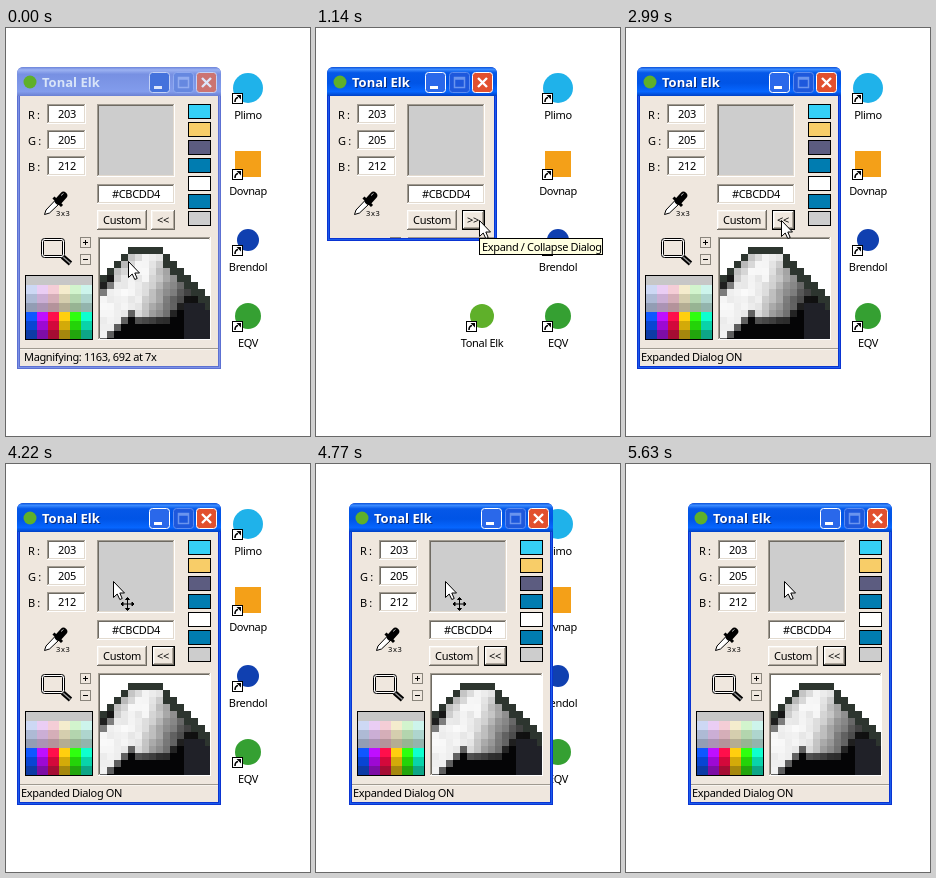
Animation of 304x408 px, one loop 6360 ms. Source, as an HTML page:

```html
<!DOCTYPE html>
<html lang="en">
<head>
<meta charset="utf-8">
<title>Color picker demo</title>
<style>
html, body { margin: 0; width: 100%; height: 100%; overflow: hidden; background: #fff; }
svg { display: block; }
text { font: 11px "Noto Sans", "Open Sans", sans-serif; letter-spacing: -.35px; white-space: pre; }
.mid { text-anchor: middle; }
.title { font: 700 13px "Open Sans", sans-serif; letter-spacing: 0; }
.tiny { font-size: 7.5px; letter-spacing: .6px; }
</style>
</head>
<body>
<svg id="stage" width="304" height="408" viewBox="0 0 304 408">
  <defs>
    <linearGradient id="on" x2="0" y2="1">
      <stop offset="0" stop-color="#0a50d8"/><stop offset=".08" stop-color="#3c8cff"/>
      <stop offset=".2" stop-color="#0558e8"/><stop offset=".55" stop-color="#0054e6"/>
      <stop offset=".85" stop-color="#0666ff"/><stop offset="1" stop-color="#0040c4"/>
    </linearGradient>
    <linearGradient id="off" x2="0" y2="1">
      <stop offset="0" stop-color="#6c84da"/><stop offset=".1" stop-color="#9cb2f2"/>
      <stop offset=".25" stop-color="#7790e2"/><stop offset=".85" stop-color="#829cec"/>
      <stop offset="1" stop-color="#6a80d2"/>
    </linearGradient>
  </defs>
  <g id="desk"></g>
  <g id="win">
    <g id="frame"></g>
    <svg id="body" x="3" y="29">
      <g transform="translate(-14 -68)">
        <g id="controls"></g><g id="toggle"></g><g id="status"></g>
      </g>
    </svg>
  </g>
  <g id="tip"></g>
  <g id="cursor"></g>
</svg>
<script>
const LOOP = 6360, FACE = '#efe7de', APP = 'Tonal Elk';
const $ = id => document.getElementById(id);
const rect = (x, y, w, h, fill, more = '') =>
  `<rect x="${x}" y="${y}" width="${w}" height="${h}" fill="${fill}" ${more}/>`;
const text = (x, y, s, cls = '', fill = '#000') =>
  `<text x="${x}" y="${y}" class="${cls}" fill="${fill}">${s}</text>`;
const path = (d, stroke, width = 1, fill = 'none') =>
  `<path d="${d}" stroke="${stroke}" stroke-width="${width}" fill="${fill}"/>`;
const dot = (x, y, r, fill) => `<circle cx="${x}" cy="${y}" r="${r}" fill="${fill}"/>`;

// Box with a shaded top left and bottom right edge
const bevel = (x, y, w, h, fill, tl, br) =>
  rect(x, y, w, h, br) + rect(x, y, w - 1, h - 1, tl) + rect(x + 1, y + 1, w - 2, h - 2, fill);
const sunken = (x, y, w, h, fill = '#fff') =>
  bevel(x, y, w, h, FACE, '#a09a90', '#fff') +
  bevel(x + 1, y + 1, w - 2, h - 2, fill, '#6e6a62', '#e2dacf');
const raised = (x, y, w, h) =>
  bevel(x, y, w, h, FACE, '#fff', '#6e6a62') +
  bevel(x + 1, y + 1, w - 2, h - 2, FACE, '#f6f1ea', '#b0a89e');

function shortcut(x, y) {
  return rect(x + .5, y + .5, 10, 10, '#fff', 'stroke="#000"') +
    path(`M${x + 3} ${y + 9}Q${x + 3} ${y + 5} ${x + 6} ${y + 4.5}`, '#000', 1.6) +
    `<path d="M${x + 4.5} ${y + 2}h4.5v4.5z"/>`;
}

function drawDesk() {
  const icon = (cx, row, mark, label) => {
    const y = 44 + row * 76;
    return mark(cx, y + 16) + shortcut(cx - 16, y + 21) + text(cx, y + 47, label, 'mid');
  };
  return icon(242, 0, (x, y) => dot(x, y, 15, '#1fb2ea'), 'Plimo') +
    icon(242, 1, (x, y) => rect(x - 13, y - 13, 26, 26, '#f4a018'), 'Dovnap') +
    icon(242, 2, (x, y) => dot(x, y, 11, '#1040b0'), 'Brendol') +
    icon(242, 3, (x, y) => dot(x, y, 13, '#35a032'), 'EQV') +
    icon(166, 3, (x, y) => dot(x, y, 12, '#5fb02a'), APP);
}

const noise = (c, r) => {
  const n = Math.sin(c * 12.99 + r * 78.23) * 43758.5;
  return n - Math.floor(n);
};

// Shade of one enlarged pixel: a dark outlined hill, lit from the left
function hillColor(c, r) {
  const top = 1 + Math.max(0, 4 - c, c - 8);
  if (r < top) return '#fff';
  if (r === top || (c > 8 && r === top + 1)) return '#2d352f';
  const ridge = c < 5 ? 13.4 - c * 1.1 : 10 - Math.max(0, c - 9) * .7;
  if (r > ridge + 1) return c > 11 ? '#202128' : '#050506';
  let v = 250 - Math.max(0, c + r * .4 - 8) * 26 - noise(c, r) * 20;
  if (c + r < 8) v -= (8 - c - r) * (c < 2 ? 110 : 25);
  if (r > ridge) v *= .4;
  v = Math.max(16, Math.round(v));
  return `rgb(${v},${v},${v})`;
}

function drawHill() {
  let s = '';
  for (let r = 0; r < 15; r++) for (let c = 0; c < 16; c++) {
    s += rect(94 + c * 7, 212 + r * 7, Math.min(7, 110 - c * 7), Math.min(7, 99 - r * 7), hillColor(c, r));
  }
  return s;
}

function drawPalette() {
  const hues = [222, 284, 345, 48, 112, 168];
  const tones = [[0, 78], [65, 88], [32, 76], [18, 64], [100, 53], [92, 43], [85, 35]];
  let s = rect(19, 247, 68, 65, '#000');
  tones.forEach(([sat, light], r) => hues.forEach((hue, c) => {
    s += rect(20 + c * 11, 248 + r * 9, 11, 9, `hsl(${hue} ${sat}% ${light}%)`);
  }));
  return s;
}

function drawDropper() {
  return '<g transform="translate(0 -1)">' +
    path('M38.5 187.5L40 183 49 173.5 53 177 43.5 186Z', '#000', 1, '#fff') +
    path('M47.5 170.5L56 179', '#000', 3) +
    '<path d="M52.5 174L57.5 168.5" stroke="#000" stroke-width="7.5" stroke-linecap="round"/>' +
    path('M55 168.5L57.5 166.5', '#bbb') + '</g>' + text(50, 188, '3x3', 'tiny');
}

function drawLens() {
  const handle = (color, width) => path('M56.5 228.5L64.5 235.5', color, width);
  return handle('#000', 5) + handle('#999', 1.5) +
    rect(35.5, 210.5, 23, 19, '#fff', 'rx="3" stroke="#000"') +
    rect(37.5, 212.5, 19, 15, FACE, 'rx="1" stroke="#000"');
}

function drawControls() {
  let s = rect(11, 39, 204, 302, FACE);
  [['R', 203], ['G', 205], ['B', 212]].forEach(([name, value], i) => {
    const y = 76 + i * 26;
    s += text(22, y + 15, name + ' :') + sunken(41, y, 39, 20) + text(61, y + 14, value, 'mid');
  });
  s += sunken(91, 76, 78, 73, '#cdcdcd') + sunken(91, 156, 78, 20) + text(130, 170, '#CBCDD4', 'mid');
  s += raised(91, 182, 50, 20) + text(116, 196, 'Custom', 'mid');

  ['#35d0f6', '#f8cd68', '#5c5c80', '#007cb0', '#fff', '#007cb0', '#cdcdcd'].forEach((fill, i) => {
    s += rect(182.5, Math.round(76 + i * 17.91) + .5, 22, 14, fill, 'stroke="#000"');
  });

  s += drawDropper() + drawLens();
  [209, 226].forEach((y, i) => {
    s += rect(74.5, y + .5, 10, 10, FACE, 'stroke="#8a857c"') + path(`M77 ${y + 5.5}h5`, '#000');
    if (!i) s += path(`M79.5 ${y + 3}v5`, '#000');
  });

  s += drawPalette() + sunken(92, 209, 113, 103) + drawHill();
  return s + rect(14, 320, 198, 1, '#a09a90') + rect(14, 321, 198, 1, '#f8f4ee');
}

function drawFrame(w, h, active) {
  const edge = active ? '#0a34d2' : '#5c70d2', inner = active ? '#1a5cea' : '#7c92e6';
  const outline = (i, fill) => path(
    `M${i} ${h - i}V7Q${i} ${i} 7 ${i}H${w - 7}Q${w - i} ${i} ${w - i} 7V${h - i}Z`, 'none', 0, fill);
  let s = outline(0, edge) + outline(1, inner) + rect(2, 27, w - 4, h - 29, edge) +
    `<path d="M0 29V7Q0 0 7 0H${w - 7}Q${w} 0 ${w} 7V29Z" fill="url(#${active ? 'on' : 'off'})"/>`;
  s += dot(13, 15, 6.5, '#5fb02a');
  if (active) s += text(26, 21, APP, 'title', '#062a80');
  s += text(25, 20, APP, 'title', active ? '#fff' : '#d8e4f8');

  const button = (x, fill, line, mark, ink) =>
    rect(x + .5, 5.5, 20, 20, fill, `rx="3" stroke="${line}"`) +
    `<g transform="translate(${x} 5)">${mark(ink)}</g>`;
  const bar = ink => rect(5, 14, 8, 3, ink);
  const box = ink => path('M5.5 5.5h10v10h-10zM5 7h11', ink, 1.5);
  const cross = ink => path('M6 6L15 15M15 6L6 15', ink, 2.4);
  const line = active ? '#fff' : '#c4d2f6', ink = active ? '#fff' : '#dde6fa';
  s += button(w - 72, active ? '#2a68ea' : '#4472dc', line, bar, ink);
  s += button(w - 48, active ? '#1e58dc' : '#6688e0', active ? '#5c8cf0' : '#90aaf0', box, active ? '#6a94ee' : '#92acf0');
  return s + button(w - 25, active ? '#e2502e' : '#cc7472', line, cross, ink);
}

function drawToggle(sign, focus, pressed) {
  const face = pressed ? bevel(147, 183, 21, 18, FACE, '#6e6a62', '#fff')
    : focus ? raised(147, 183, 21, 18) : raised(145, 182, 24, 20);
  const n = pressed ? 1 : 0;
  return (focus ? rect(146, 182, 23, 20, '#000') : '') + face + text(157 + n, 196 + n, sign, 'mid');
}

const ARROW = path('M.5.5V16.5L4.2 13 6.8 18.5 9.2 17.5 6.8 12H11.5Z', '#000', 1, '#fff');
const CROSS = '<g transform="translate(14.5 23)">' + [0, 90, 180, 270].map(a =>
  `<path transform="rotate(${a})" d="M0 0V-5M0-6.5L-2-4.5H2Z" stroke="#000"/>`).join('') + '</g>';

// Stepped positions: time, then value
const windowKeys = [[0, 11], [4280, 12], [4410, 13], [4470, 15], [4530, 17], [4590, 20],
  [4650, 23], [4710, 28], [4770, 33], [4830, 41]];
const cursorKeys = [[0, 122, 233], [60, 126, 226], [120, 134, 211], [180, 129, 220], [240, 122, 234],
  [500, 132, 223], [560, 151, 203], [620, 163, 192]];
const at = (keys, t) => keys.filter(k => k[0] <= t).pop();
const bezier = (a, b, c, d, u) => {
  const v = 1 - u;
  return Math.round(v * v * v * a + 3 * v * v * u * b + 3 * v * u * u * c + u * u * u * d);
};

function windowX(t) {
  if (t < 4890) return at(windowKeys, t)[1];
  const u = Math.min(9, Math.floor((t - 4830) / 60)) / 9;
  return Math.round(62 - 21 * (1 - u) ** 2);
}

function cursorPos(t) {
  if (t < 2990) return at(cursorKeys, t).slice(1);
  if (t < 3650) {
    const u = Math.floor((t - 2990) / 60) / 10;
    return [bezier(155, 125, 66, 92, u), bezier(192, 176, 123, 120, u)];
  }
  if (t < 4220) {
    const u = Math.min(5, Math.floor((t - 3590) / 60)) / 5;
    return [Math.round(92 + 15 * u * (2 - u)), Math.round(120 - 3 * u)];
  }
  return [windowX(t) + 96, 117];
}

const cache = {};
function put(id, key, make) {
  if (cache[id] === key) return;
  cache[id] = key;
  $(id).innerHTML = make();
}

function render(t) {
  const small = t >= 880 && t < 1860, active = t >= 820;
  const pressed = (t >= 820 && t < 880) || (t >= 1800 && t < 1860);
  const dragging = t >= 4220 && t < 5630;
  const w = small ? 170 : 204, h = small ? 174 : 302;
  put('frame', `${w} ${active}`, () => drawFrame(w, h, active));
  put('toggle', `${small} ${active} ${pressed}`, () =>
    drawToggle(small ? '&gt;&gt;' : '&lt;&lt;', active, pressed));
  put('status', t < 880, () => t < 880
    ? text(18, 333, 'Magnifying: 1163, 692 at 7x') : text(15, 333, 'Expanded Dialog ON'));
  put('cursor', dragging, () => ARROW + (dragging ? CROSS : ''));
  $('body').setAttribute('width', w - 6);
  $('body').setAttribute('height', h - 32);
  $('win').setAttribute('transform', `translate(${windowX(t)} 39)`);
  $('tip').style.display = t >= 1140 && t < 1800 ? '' : 'none';
  $('cursor').setAttribute('transform', `translate(${cursorPos(t).join(' ')})`);
}

$('desk').innerHTML = drawDesk();
$('controls').innerHTML = drawControls();
$('tip').innerHTML = rect(163.5, 210.5, 123, 16, '#ffffe1', 'stroke="#000"') +
  text(166, 223, 'Expand / Collapse Dialog');

const start = performance.now();
function tick() {
  render((performance.now() - start) % LOOP);
  requestAnimationFrame(tick);
}
tick();
</script>
</body>
</html>
```
